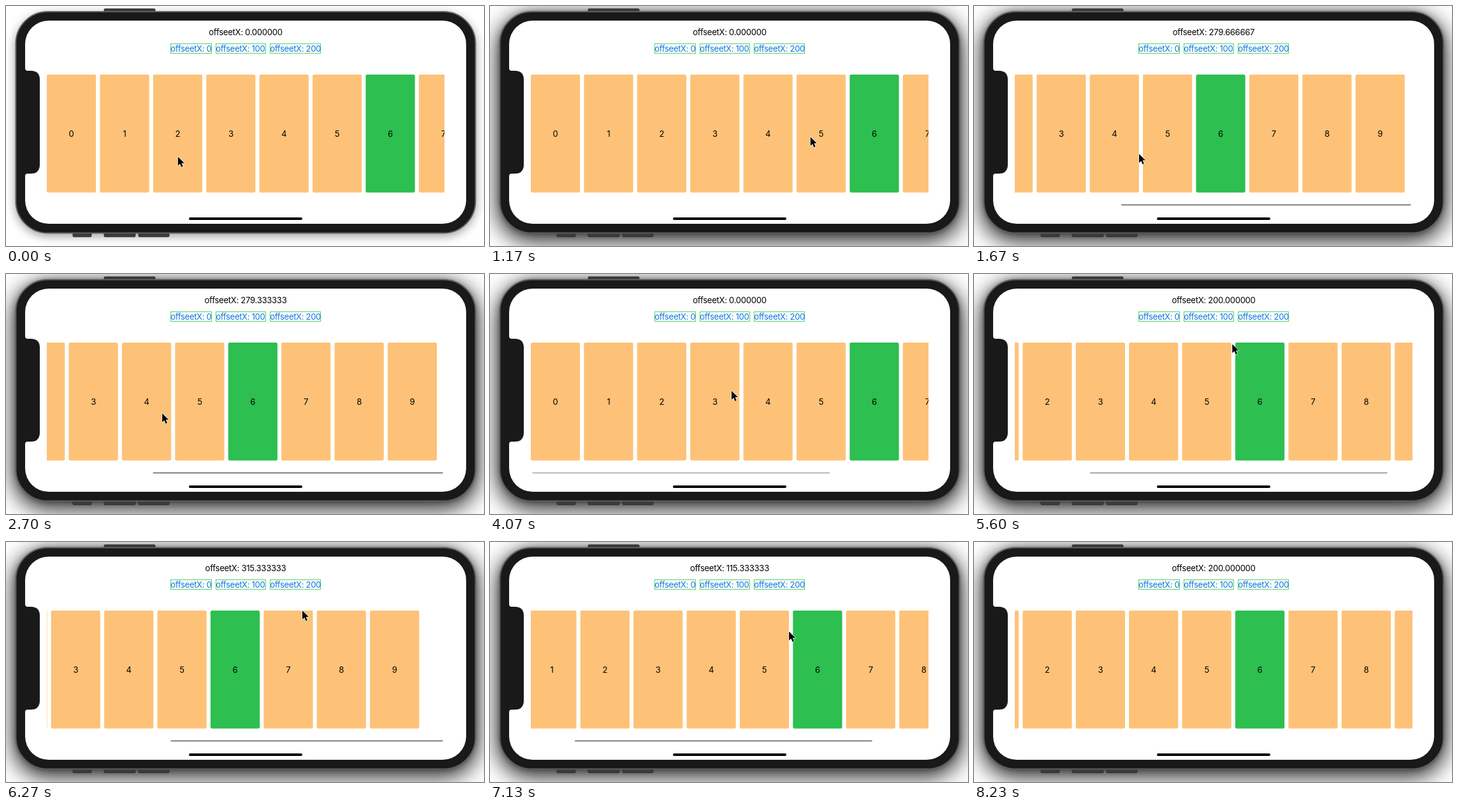
Animation, 750 px wide and 378 px high, one loop 8310 ms. Source, as an HTML page:

```html
<!DOCTYPE html>
<html lang="en">
<head>
<meta charset="utf-8">
<title>Scroll offset demo</title>
<style>
html, body { margin: 0; width: 100%; height: 100%; overflow: hidden; background: #fff; }
#stage { position: relative; width: 750px; height: 378px; overflow: hidden; }
#shadow { position: absolute; left: 15px; top: 9px; width: 722px; height: 349px; border-radius: 51px;
  box-shadow: 0 4px 16px rgba(0, 0, 0, .42); }
#shadow.active { box-shadow: 0 9px 34px 4px rgba(0, 0, 0, .82), 0 0 10px rgba(0, 0, 0, .35); }
svg { position: absolute; left: 0; top: 0; display: block; }
text { font: 13.1px Inter, "Liberation Sans", sans-serif; letter-spacing: -.28px; }
.mid { text-anchor: middle; }
.link { fill: #0f74e0; letter-spacing: -.34px; }
.box { fill: none; stroke: #50d26c; stroke-width: 1; }
</style>
</head>
<body>
<div id="stage">
  <div id="shadow"></div>
  <svg width="750" height="378" viewBox="0 0 750 378">
    <defs><clipPath id="view"><rect x="64" y="100" width="624" height="200"/></clipPath></defs>
    <g fill="#3b3b3c" stroke="#262627" stroke-width=".8">
      <rect x="154" y="4.3" width="80" height="8" rx="1.5"/>
      <rect x="105" y="354" width="29" height="9.6" rx="1.5"/>
      <rect x="154" y="354" width="49" height="9.6" rx="1.5"/>
      <rect x="208" y="354" width="48" height="9.6" rx="1.5"/>
    </g>
    <rect x="15.5" y="9" width="721" height="348.5" rx="50" fill="#191919" stroke="#5d5d5f" stroke-width="2"/>
    <rect x="30" y="23" width="692" height="320" rx="37" fill="#fff"/>
    <path d="M29 98H30Q30 102 34 102H39Q53 102 53 116V250Q53 264 39 264H34Q30 264 30 268H29Z" fill="#191919"/>
    <text id="label" class="mid" x="376" y="46"></text>
    <g id="links"></g>
    <g clip-path="url(#view)"><g id="cards"></g></g>
    <rect id="bar" y="312" height="2.4" rx="1.2" fill="#969696"/>
    <rect x="287" y="333" width="178" height="3.9" rx="1.9" fill="#000"/>
    <path id="cursor" d="M1 1V15L4.2 12L6.5 17.2L8.8 16.2L6.6 11H11Z" fill="#000" stroke="#fff" stroke-width="1.3" stroke-linejoin="round" paint-order="stroke"/>
  </svg>
</div>
<script>
const LOOP = 8310;
const SCALE = 0.7722;      // pixels per point
const VIEW = 808, PITCH = 108, CARDS = 10;
const CONTENT = CARDS * PITCH - 8, MAX = CONTENT - VIEW;
const BAR_LEFT = 66.3, BAR_RIGHT = 685.6;
const BAR_LENGTH = (BAR_RIGHT - BAR_LEFT) * VIEW / CONTENT;

// every gesture: travel to the start, sweep, hold, settle, then the bar fades
const TRAVEL = 350, SWEEP = 360, HOLD = 60, SETTLE = 400, BAR_DELAY = 150, BAR_FADE = 400;

// `by` is the finger's way in points, x and y where it ends, `rest` the final offset
const gestures = [
  { end: 0, by: 0, x: 249, y: 247, rest: 0 },
  { end: 660, by: 0, x: 593, y: 66, rest: 0 },
  { end: 1620, by: 293.05, x: 258, y: 232, rest: 200 },
  { end: 2650, by: 92.42, x: 252, y: 232, rest: 200 },
  { end: 3290, by: -200, x: 378, y: 183, rest: 0 },
  { end: 4880, by: 278.07, x: 375, y: 110, rest: 200 },
  { end: 6230, by: 163.66, x: 464, y: 107, rest: 200 },
  { end: 7220, by: -100, x: 480, y: 140, rest: 200 }
];

const $ = id => document.getElementById(id);
const clamp = (v, lo, hi) => Math.min(hi, Math.max(lo, v));
const phase = (t, start, length) => clamp((t - start) / length, 0, 1);
const smooth = p => p * p * (3 - 2 * p);
const settle = p => 1 - (1 - p) ** 4;
const mix = (a, b, p) => a + (b - a) * p;

// past the ends the content follows the finger with growing resistance
function rubber(raw) {
  const inside = clamp(raw, 0, MAX);
  const over = Math.abs(raw - inside);
  return inside + Math.sign(raw - inside) * VIEW * (1 - 1 / (over * .55 / VIEW + 1));
}

function offsetIn(g, t) {
  const dragged = rubber(g.from + g.by * smooth(phase(t, g.start, SWEEP)));
  return mix(dragged, g.rest, settle(phase(t, g.end + HOLD, SETTLE)));
}

gestures.forEach((g, i) => {
  g.start = g.end - SWEEP;
  g.from = i ? offsetIn(gestures[i - 1], g.start) : 0;
  g.startX = g.x + g.by * SCALE;
});

function pointerAt(t, now, next) {
  if (next && t > next.start - TRAVEL) {
    const p = smooth(phase(t, next.start - TRAVEL, TRAVEL));
    return [mix(now.x, next.startX, p), mix(now.y, next.y, p)];
  }
  return [mix(now.startX, now.x, smooth(phase(t, now.start, SWEEP))), now.y];
}

function add(parent, tag, attrs, text = '') {
  const el = document.createElementNS('http://www.w3.org/2000/svg', tag);
  for (const [k, v] of Object.entries(attrs)) el.setAttribute(k, v);
  el.textContent = text;
  parent.append(el);
}

for (const [x, w, n] of [[258.5, 64, 0], [329.5, 78, 100], [414.5, 79, 200]]) {
  add($('links'), 'rect', { class: 'box', x, y: 59.5, width: w, height: 15 });
  add($('links'), 'text', { class: 'link', x: x - .2, y: 72 }, 'offseetX: ' + n);
}
for (let i = 0; i < CARDS; i++) {
  const x = 64 + i * PITCH * SCALE;
  add($('cards'), 'rect', {
    x, y: 108, width: 100 * SCALE, height: 185.8, rx: 2.3,
    fill: i === 6 ? '#2dbf50' : '#fdc278'
  });
  add($('cards'), 'text', { class: 'mid', x: x + 50 * SCALE, y: 206 }, i);
}

function drawBar(offset, alpha) {
  const inside = clamp(offset, 0, MAX);
  const over = Math.abs(offset - inside) * SCALE;
  const room = BAR_RIGHT - BAR_LEFT - BAR_LENGTH;
  const x = BAR_LEFT + room * inside / MAX + (offset > MAX ? over : 0);
  $('bar').setAttribute('x', x);
  $('bar').setAttribute('width', BAR_LENGTH - over);
  $('bar').setAttribute('opacity', alpha);
}

function draw(t) {
  const i = gestures.filter(g => g.start <= t).length - 1;
  const now = gestures[i], next = gestures[i + 1];
  const offset = Math.round(offsetIn(now, t) * 3) / 3;
  const fade = phase(t, now.end + HOLD + SETTLE + BAR_DELAY, BAR_FADE);
  const [x, y] = pointerAt(t, now, next);
  $('label').textContent = 'offseetX: ' + offset.toFixed(6);
  $('cards').setAttribute('transform', `translate(${-offset * SCALE} 0)`);
  drawBar(offset, now.by ? 1 - fade : 0);
  $('cursor').setAttribute('transform', `translate(${x} ${y})`);
  $('cursor').setAttribute('visibility', next || fade < 1 ? 'visible' : 'hidden');
  $('shadow').classList.toggle('active', t >= 670);
}

const start = performance.now();
function tick() {
  draw(Math.max(0, performance.now() - start) % LOOP);
  requestAnimationFrame(tick);
}
tick();
</script>
</body>
</html>
```
